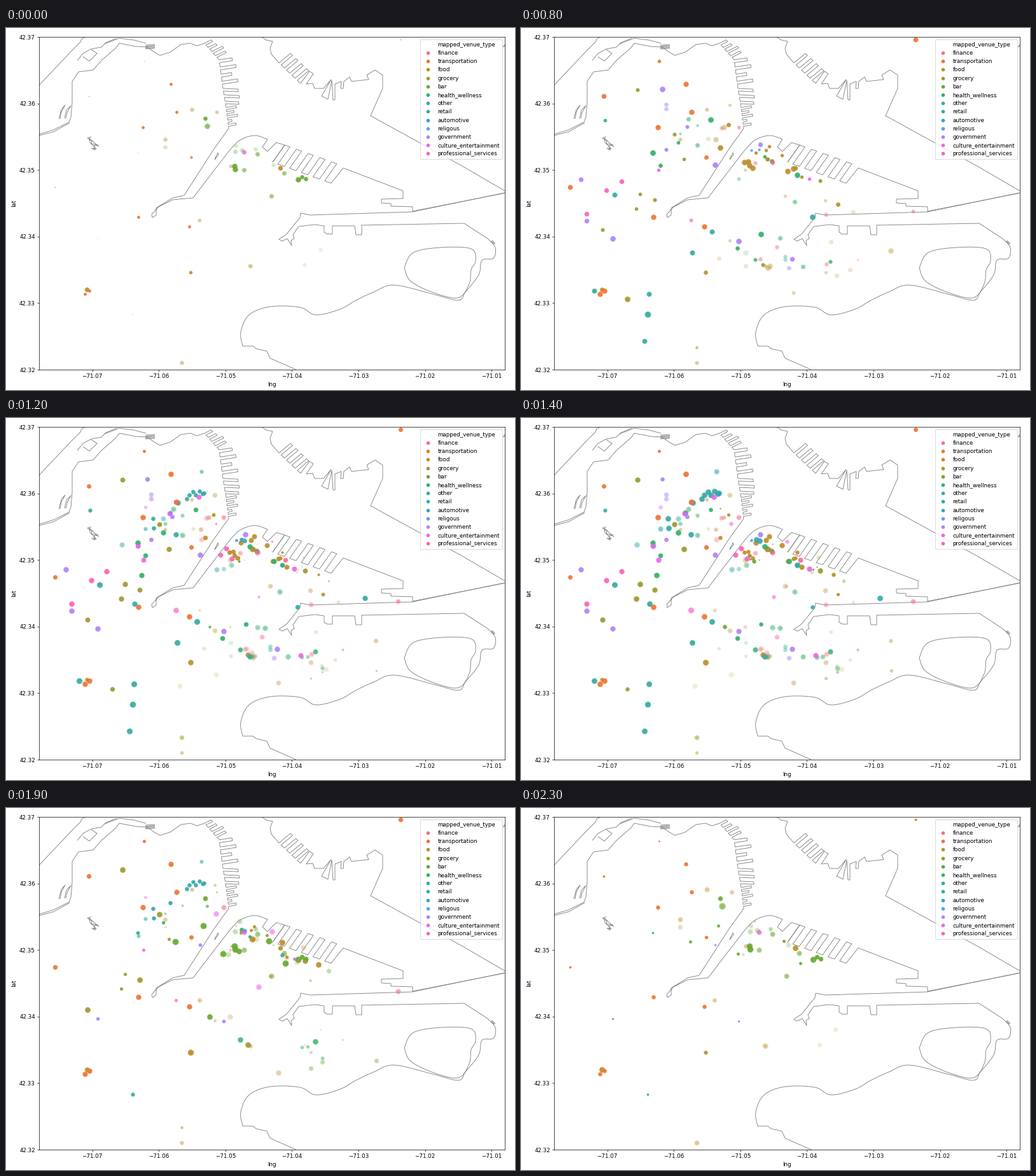
Write a matplotlib script that moves like this. It is 800 px wide and 569 px high and loops after 2400 ms.

```python
import numpy as np
import matplotlib.pyplot as plt
from matplotlib.animation import FuncAnimation
from matplotlib.collections import LineCollection
from matplotlib.lines import Line2D

W, H, DPI = 800, 569, 63
LEFT, RIGHT, TOP, BOTTOM = 52, 784, 14, 537
WEST, EAST, SOUTH, NORTH = -71.078, -71.008, 42.32, 42.37

COLORS = {
    "finance": "#fb6b8b", "transportation": "#ee7532", "food": "#bd8f2b",
    "grocery": "#9f9a30", "bar": "#68a932", "health_wellness": "#33b06a",
    "other": "#35aca0", "retail": "#36a9a9", "automotive": "#2fa5d8",
    "religous": "#5c9ffb", "government": "#ae84fa",
    "culture_entertainment": "#f064f0", "professional_services": "#fb62bb",
}

# Relative popularity at selected hours of the day
HOURS = [0, 4, 8, 10, 14, 19, 23]
SCHEDULES = {
    "transit": [.55, .25, .95, .95, 1, .95, .75],
    "round": [.85, .6, .8, .75, .7, .85, 1],
    "commute": [.2, 0, 1, .9, .9, .95, .5],
    "early": [0, 0, 1, .95, .75, 0, 0],
    "work": [0, 0, .85, 1, .95, 0, 0],
    "long": [.1, 0, 1, 1, .95, .65, .4],
    "day": [0, 0, .65, .9, 1, .6, 0],
    "all": [0, 0, .7, .85, .95, 1, 0],
    "mid": [0, 0, 0, .9, 1, 0, 0],
    "shop": [0, 0, 0, .55, 1, .75, 0],
    "dinner": [0, 0, 0, .2, .75, 1, 0],
    "evening": [0, 0, 0, 0, 0, 1, .5],
    "late": [.85, 0, 0, 0, .3, 1, .95],
    "night": [.85, 0, 0, 0, 0, .5, 1],
}

coast, venues = [], []


def spline(pts, steps=8):
    """Catmull-Rom curve through the points."""
    p = np.array([pts[0], *pts, pts[-1]], float)
    t = np.linspace(0, 1, steps)[:, None]
    return np.vstack([
        b + .5 * t * (c - a + t * (2 * a - 5 * b + 4 * c - d
                                   + t * (3 * (b - c) + d - a)))
        for a, b, c, d in zip(p, p[1:], p[2:], p[3:])])


def shore(*pts, smooth=False):
    coast.append(spline(pts) if smooth else np.array(pts, float))


def piers(start, end, tooth, count, width=.45, jitter=0., seed=0):
    """A row of piers along the line from start to end."""
    rng = np.random.default_rng(seed)
    start, tooth = np.array(start), np.array(tooth)
    pitch = (np.array(end) - start) / count
    pts = []
    for i in range(count):
        a = start + i * pitch
        b = a + width * pitch
        t = tooth * (1 + jitter * rng.uniform(-1, 1))
        pts += [a, a + t, b + t, b]
    coast.append(np.array(pts + [end]))


def add(kind, schedule, *spots, r=4.4, alpha=.88):
    for x, y in spots:
        venues.append((x, y, r, alpha, kind, schedule))


# Western shore
shore((52, 90), (102, 37), (117, 22), (119, 17), (125, 14))
shore((52, 167), (75, 160), (99, 148), (102, 140), (104, 117), (104, 84),
      (114, 69), (137, 66), (150, 51), (173, 31), (178, 24), (204, 29),
      (222, 30), (233, 38), (242, 43), (258, 38), (275, 26), (290, 24),
      (300, 28), (312, 24))
shore((52, 169), (75, 163), (100, 149))
shore((83, 143), (87, 128), (93, 121), (87, 132), (85, 143))
shore((92, 142), (95, 129), (102, 122), (96, 133), (94, 142))
shore((112, 51), (121, 40), (134, 33), (150, 30), (157, 23), (174, 16))
shore((121, 45), (131, 52), (143, 40), (134, 34))
shore((155, 25), (178, 16), (201, 19), (220, 24))
shore((134, 171), (128, 173), (135, 178), (134, 182), (145, 184), (138, 185),
      (140, 192), (135, 189), (142, 190), (132, 180), (131, 173), (146, 187))
piers((312, 24), (335, 50), (14, -7), 4, .4, .3, 3)
piers((335, 50), (341, 95), (20, -3), 4, .4, .25, 1)
piers((341, 95), (346, 125), (21, 1), 3, .4, .2, 5)
piers((346, 125), (350, 158), (11, -2), 5, .5, .5, 4)
shore((350, 158), (327, 190), (280, 263))
shore((280, 263), (262, 267), (236, 283), (236, 294), (230, 298), (229, 293),
      (240, 281), (262, 270), (294, 267))
shore((294, 267), (330, 220), (357, 186), (372, 174), (392, 169), (411, 175),
      smooth=True)
shore((328, 206), (333, 196), (334, 199), (328, 207))

# Southern peninsula
shore((411, 175), (403, 187), (411, 194), (425, 180), (438, 184), (419, 211))
piers((419, 211), (511, 244), (19, -27), 5)
shore((511, 244), (530, 220), (624, 256), (624, 268), (590, 269), (590, 275),
      (605, 276), (605, 280), (639, 281), (639, 289), (478, 294), (463, 291),
      (462, 298), (441, 324), (429, 332), (434, 335), (442, 331), (449, 342),
      (448, 334), (453, 331), (451, 325), (460, 312), (485, 309), (500, 311),
      (500, 321), (505, 324), (513, 324), (513, 311), (548, 311), (550, 325),
      (559, 325), (559, 310), (720, 307), (757, 331))
shore((757, 331), (769, 345), (766, 362), (748, 365), (743, 388), (722, 415),
      (711, 428), (670, 418), (610, 404), (578, 415), (550, 428), (525, 442),
      (487, 451), (462, 439), (415, 438), (382, 451), (369, 478), (372, 500),
      smooth=True)
shore((372, 500), (388, 500), (393, 504), (410, 508), (415, 519), (456, 537))
shore((626, 377), (640, 353), (684, 345), (731, 347), (738, 366), (731, 380),
      (728, 402), (711, 424), (672, 416), (636, 398), (626, 377), smooth=True)
shore((639, 289), (784, 259))
shore((639, 288), (784, 259.5))

# Northern shore
shore((402, 14), (409, 19), (419, 21), (415, 32), (417, 41), (429, 55))
piers((429, 55), (463, 87), (18, -15), 4, .4)
shore((463, 87), (477, 68), (483, 72), (472, 88), (482, 87), (485, 95),
      (499, 95), (511, 81), (496, 107), (506, 112), (512, 82), (514, 113),
      (517, 113), (517, 88), (527, 84), (526, 95), (530, 95), (531, 84),
      (540, 77), (543, 84), (570, 81), (567, 74), (580, 66), (592, 74),
      (592, 95), (573, 138), (717, 217), (784, 256))

# Small hatched docks
for k in range(5):
    shore((219, 27 + 1.5 * k), (234, 26 + 1.5 * k))
    shore((762 + k, 336 + k), (765 + k, 334 + k))
for k in range(2):
    shore((781 + k, 30), (784, 26 + 2 * k))

add("food", "early", (313, 188), (351, 211), (357, 210), (359, 216),
    (364, 220), (419, 225), (428, 221))
add("food", "early", (326, 152), (498, 277), r=3.5)
add("food", "early", (306, 175), (319, 156), (391, 374), (388, 377),
    (581, 350), alpha=.35)
add("food", "early", (294, 174), (487, 336), (496, 389), (311, 362),
    (353, 374), (517, 380), (522, 289), r=3.8, alpha=.17)
add("food", "day", (390, 186), (369, 196), (410, 200), (441, 234), (385, 192),
    (388, 206), r=4.2)
add("food", "day", (328, 121), (328, 334), (479, 384), (478, 271), (415, 264),
    (352, 223), alpha=.3, r=4.2)
add("food", "all", (290, 384), (387, 206), r=4.8)
add("food", "all", (428, 416), alpha=.3)
add("food", "dinner", (491, 246), (434, 211))
add("food", "dinner", (467, 219), (441, 235), (352, 328), (393, 206),
    (304, 302), (457, 242), alpha=.22)
add("food", "mid", (273, 421), (379, 362), (330, 403), (503, 395), alpha=.13)
add("food", "round", (431, 220), (127, 411))
add("food", "round", (250, 175), (276, 526), (384, 374), (292, 128),
    r=4.1, alpha=.36)
add("food", "night", (304, 302), (331, 132), (353, 217), r=3.6, alpha=.35)
add("food", "night", (382, 373), (494, 348), (469, 372), r=4, alpha=.12)
add("food", "night", (290, 384), r=3.2)

add("grocery", "day", (187, 261), (181, 284), (256, 206))
add("grocery", "day", (276, 502), r=3.9, alpha=.45)
add("grocery", "all", (183, 97), (241, 167), (210, 270), (128, 317),
    (380, 372), (470, 240))
add("grocery", "early", (167, 426))

add("health_wellness", "early", (298, 144), (377, 324), (434, 231))
add("health_wellness", "early", (353, 353), alpha=.14)
add("health_wellness", "work", (219, 216), (340, 346), (394, 209), r=4)
add("health_wellness", "work", (430, 273), (407, 330), (263, 143), (443, 375),
    (277, 184), alpha=.45)
add("health_wellness", "day", (277, 153), (250, 166), r=3.4, alpha=.4)
add("health_wellness", "day", (247, 180), (383, 202))
add("health_wellness", "all", (368, 364), (486, 367), alpha=.75)
add("health_wellness", "long", (207, 196))
add("health_wellness", "mid", (213, 247), (421, 225))
add("health_wellness", "mid", (395, 329), (354, 231), (387, 374), alpha=.4)
add("health_wellness", "shop", (474, 375), (465, 376), (497, 393), r=4,
    alpha=.4)

add("other", "work", (147, 262), (115, 413), (201, 418), (194, 492),
    (300, 320), (269, 353), r=4.7)
add("other", "work", (132, 145), r=3.3)
add("other", "work", (342, 237), (415, 359), (415, 364), r=3.8, alpha=.32)
add("other", "long", (199, 450), r=4.9)
add("retail", "early", (458, 297))
add("retail", "mid", (564, 283), (202, 292), (267, 183), (270, 133),
    (383, 375))
add("retail", "mid", (247, 158), (182, 199), (331, 238), alpha=.4)
add("retail", "shop", (284, 127), (288, 121), (294, 116), (298, 121),
    (304, 115), (309, 119), (311, 118), (231, 158), (232, 173), (370, 191),
    (375, 193), (258, 149), (434, 231))
add("retail", "shop", (307, 84), (219, 174), (208, 201), r=4.2, alpha=.5)
add("religous", "work", (362, 192), (374, 191), r=2.5)

add("government", "early", (222, 96))
add("government", "work", (94, 238), (103, 303), (426, 363), (376, 183))
add("government", "work", (228, 191), (261, 155), r=3.6)
add("government", "work", (228, 120), (421, 377), (228, 127), r=4.1,
    alpha=.4)
add("government", "long", (144, 331), (305, 215), (342, 335))

add("culture_entertainment", "day", (216, 223), (453, 237), r=4.2)
add("culture_entertainment", "day", (529, 364), r=2.4, alpha=.4)
add("culture_entertainment", "mid", (207, 201), (257, 150), (303, 124),
    (463, 373), r=4.2)
add("culture_entertainment", "shop", (219, 140), r=3.6, alpha=.35)
add("culture_entertainment", "dinner", (397, 281), (418, 194), (330, 166),
    alpha=.5)
add("culture_entertainment", "late", (374, 195), r=4.1, alpha=.75)

add("professional_services", "work", (134, 255), (158, 241), (103, 292))
add("professional_services", "mid", (337, 215), (355, 221), (346, 205), r=4.1)
add("professional_services", "day", (267, 302), r=4.7, alpha=.6)

add("finance", "mid", (267, 132), (439, 223), r=4)
add("finance", "mid", (307, 191), (386, 369), alpha=.3)
add("finance", "work", (395, 211), alpha=.8)
add("finance", "work", (368, 212), (480, 371), (402, 344), (376, 363),
    (479, 293), (315, 157), r=4.1, alpha=.38)
add("finance", "all", (342, 156), (616, 288), r=4.2, alpha=.5)

add("transportation", "transit", (259, 88), (268, 132), (215, 156),
    (208, 297), (288, 312), (124, 418), (131, 413))
add("transportation", "transit", (291, 203), r=3.7)
add("transportation", "commute", (130, 107), (77, 250), (620, 18), r=3.9)
add("transportation", "commute", (217, 52), r=2.8)

add("bar", "late", (360, 222), (359, 217), (459, 238), r=5)
add("bar", "late", (313, 142), (465, 234), (471, 237), r=3.9)
add("bar", "late", (374, 223), (417, 264), (395, 198), (437, 228),
    r=4.3, alpha=.5)
add("bar", "late", (371, 192), (360, 194), alpha=.28)
add("bar", "night", (316, 154), r=5.2, alpha=.6)
add("bar", "night", (420, 215), (250, 187), (361, 185), (392, 190), r=4,
    alpha=.2)
add("bar", "evening", (341, 229), (310, 185), (266, 210), (413, 209),
    (439, 244), r=4.9)
add("bar", "evening", (349, 230), (392, 190), (367, 178), alpha=.25)
add("bar", "dinner", (320, 328), (366, 225))
add("bar", "dinner", (507, 256), (582, 397), (479, 409), (497, 399),
    r=3.8, alpha=.32)


def to_geo(points):
    """Stage pixels to longitude and latitude."""
    x, y = np.asarray(points, float).T
    lng = WEST + (x - LEFT) / (RIGHT - LEFT) * (EAST - WEST)
    lat = NORTH - (y - TOP) / (BOTTOM - TOP) * (NORTH - SOUTH)
    return np.column_stack([lng, lat])


fig = plt.figure(figsize=((W + .01) / DPI, (H + .01) / DPI), dpi=DPI,
                 facecolor="white")
ax = fig.add_axes([LEFT / W, 1 - BOTTOM / H,
                   (RIGHT - LEFT) / W, (BOTTOM - TOP) / H])
ax.set(xlim=(WEST, EAST), ylim=(SOUTH, NORTH), xlabel="lng", ylabel="lat")
ax.set_xticks(np.arange(-71.07, -71.005, .01))
ax.set_yticks(np.linspace(SOUTH, NORTH, 6))
ax.xaxis.set_major_formatter(lambda v, _: f"{v:.2f}".replace("-", "\u2212"))
ax.yaxis.set_major_formatter("{x:.2f}")
ax.add_collection(LineCollection([to_geo(p) for p in coast],
                                 colors="gray", linewidths=1, zorder=1))

handles = [Line2D([], [], ls="", label="mapped_venue_type")]
handles += [Line2D([], [], ls="", marker="o", ms=6.4, mew=0, color=c, label=k)
            for k, c in COLORS.items()]
ax.legend(handles=handles, loc="upper right", labelspacing=.48).set_zorder(5)

radius = np.array([v[2] for v in venues])
alpha = np.array([v[3] for v in venues])
hourly = np.array([np.interp(range(24), HOURS, SCHEDULES[v[5]])
                   for v in venues])
spots = to_geo([v[:2] for v in venues]) + [5e-5, -5e-5]
tints = [COLORS[v[4]] for v in venues]


def dots(opacity):
    return ax.scatter(*spots.T, s=np.zeros(len(venues)), c=tints,
                      alpha=opacity, linewidths=0, zorder=2)


# A halo and a denser core for each venue
layers = [(dots(alpha), 1), (dots(alpha * .5), .62)]


def update(hour):
    r = radius * hourly[:, hour]
    for dot, scale in layers:
        dot.set_sizes((2 * r * scale * 72 / DPI) ** 2)
    return [dot for dot, _ in layers]


anim = FuncAnimation(fig, update, frames=24, interval=100, repeat=True,
                     repeat_delay=0, blit=False)
plt.show()
```
